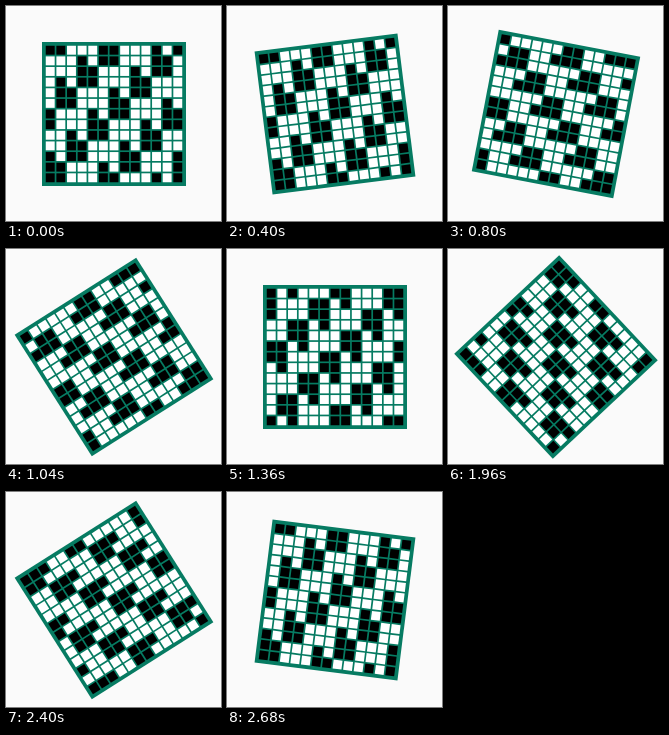
An HTML page with a canvas for the animation above (2.72 s loop, 215x215 px).

```html
<!DOCTYPE html>
<html lang="en">
<head>
<meta charset="utf-8">
<title>Turning crossword grid</title>
<style>
html, body { margin: 0; width: 100%; height: 100%; overflow: hidden; background: #fafafa; }
canvas { display: block; width: 215px; height: 215px; }
</style>
</head>
<body>
<canvas id="stage"></canvas>
<script>
const SIZE = 215, CENTER = 108, SIDE = 144;
const CELLS = 13, PITCH = 10.63, GAP = 1.7;
const LOOP = 2720, TICK = 40, REST_TICKS = 9, TURN_TICKS = 25;
const TEAL = '#067b62', PAPER = '#fafafa';

// Five-cell block, repeated on the lattice spanned by (-2, 2) and (3, 3).
const BLOCK = [[0, 0], [0, 1], [1, 1], [0, 2], [1, 2]];

const canvas = document.getElementById('stage');
const ctx = canvas.getContext('2d');
const ratio = window.devicePixelRatio || 1;
canvas.width = canvas.height = Math.round(SIZE * ratio);

function onLattice(col, row) {
  return (col + row) % 6 === 0 && (row - col) % 2 === 0 &&
    ((row - col) / 2 - (col + row) / 6) % 2 === 0
    || false;
}

function buildGrid() {
  const grid = Array.from({ length: CELLS }, () => Array(CELLS).fill(false));
  for (let i = -8; i <= 8; i++) {
    for (let j = -8; j <= 8; j++) {
      const col = 10 - 2 * i + 3 * j;
      const row = 2 * i + 3 * j;
      for (const [dx, dy] of BLOCK) {
        const x = col + dx, y = row + dy;
        if (x >= 0 && x < CELLS && y >= 0 && y < CELLS) grid[y][x] = true;
      }
    }
  }
  return grid;
}

const grid = buildGrid();

// Half a turn counter-clockwise in even ticks, after a rest.
function angleAt(time) {
  const half = LOOP / 2;
  const turns = Math.floor(time / half);
  const tick = Math.floor((time % half) / TICK);
  const step = Math.max(0, tick - REST_TICKS);
  return -Math.PI * (turns + step / TURN_TICKS);
}

function draw(time) {
  ctx.setTransform(ratio, 0, 0, ratio, 0, 0);
  ctx.fillStyle = PAPER;
  ctx.fillRect(0, 0, SIZE, SIZE);
  ctx.translate(CENTER, CENTER);
  ctx.rotate(angleAt(time));
  ctx.fillStyle = TEAL;
  ctx.fillRect(-SIDE / 2, -SIDE / 2, SIDE, SIDE);
  const start = -CELLS * PITCH / 2 + GAP / 2;
  const cell = PITCH - GAP;
  grid.forEach((line, row) => line.forEach((dark, col) => {
    ctx.fillStyle = dark ? '#000' : '#fff';
    ctx.fillRect(start + col * PITCH, start + row * PITCH, cell, cell);
  }));
}

const origin = performance.now();
function frame() {
  draw((performance.now() - origin) % LOOP);
  requestAnimationFrame(frame);
}
frame();
</script>
</body>
</html>
```
